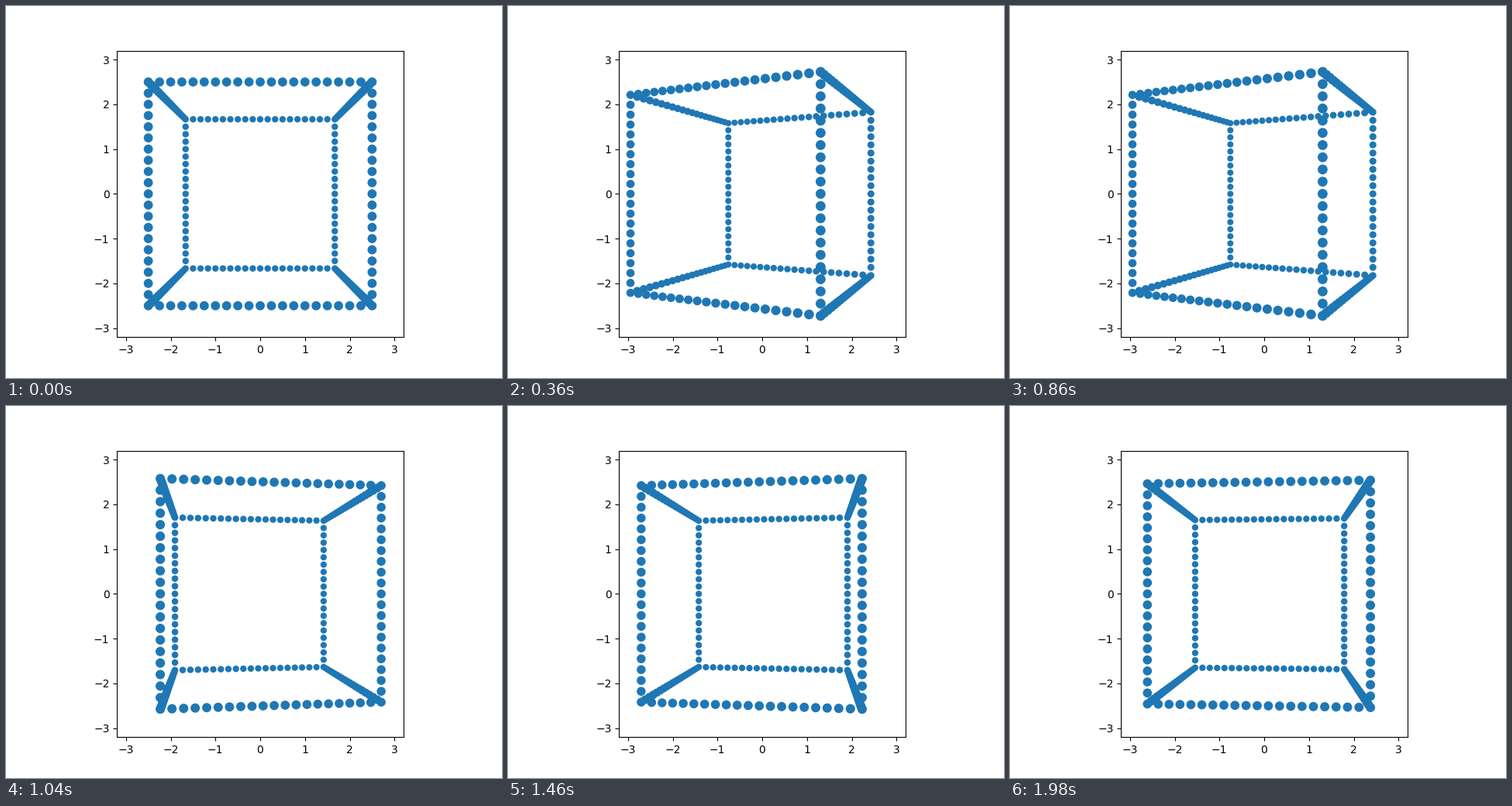
Write a matplotlib script that moves like this. It is 640x480 px and loops after 2 s.

```python
import numpy as np
import matplotlib.pyplot as plt
from matplotlib.animation import FuncAnimation

FRAMES = 100
INTERVAL = 20
CAMERA = 5      # distance from the eye to the cube's centre
FOCAL = 10
DOT = 3         # dot diameter in points at unit scale


def cube_edges(n=21):
    """Points spread evenly along the twelve edges of a cube of half-side 1."""
    t = np.linspace(-1, 1, n)
    parts = []
    for axis in range(3):
        for a in (-1, 1):
            for b in (-1, 1):
                edge = np.empty((n, 3))
                edge[:, axis] = t
                edge[:, (axis + 1) % 3] = a
                edge[:, (axis + 2) % 3] = b
                parts.append(edge)
    return np.unique(np.concatenate(parts), axis=0)


def project(points, angle):
    """Turn about the vertical axis, then apply perspective."""
    x, y, z = points.T
    c, s = np.cos(angle), np.sin(angle)
    scale = FOCAL / (CAMERA - (z * c - x * s))
    return np.column_stack([(x * c + z * s) * scale, y * scale]), scale


cube = cube_edges()

fig, ax = plt.subplots(figsize=(6.4, 4.8), dpi=100)
ax.set_aspect("equal")
ax.set_xlim(-3.2, 3.2)
ax.set_ylim(-3.2, 3.2)

start, start_scale = project(cube, 0)
dots = ax.scatter(start[:, 0], start[:, 1], s=(DOT * start_scale) ** 2, c="C0")


def update(i):
    xy, scale = project(cube, 2 * np.pi * i / FRAMES)
    dots.set_offsets(xy)
    dots.set_sizes((DOT * scale) ** 2)
    return (dots,)


anim = FuncAnimation(fig, update, frames=FRAMES, interval=INTERVAL,
                     repeat=True, repeat_delay=0)
plt.show()
```
